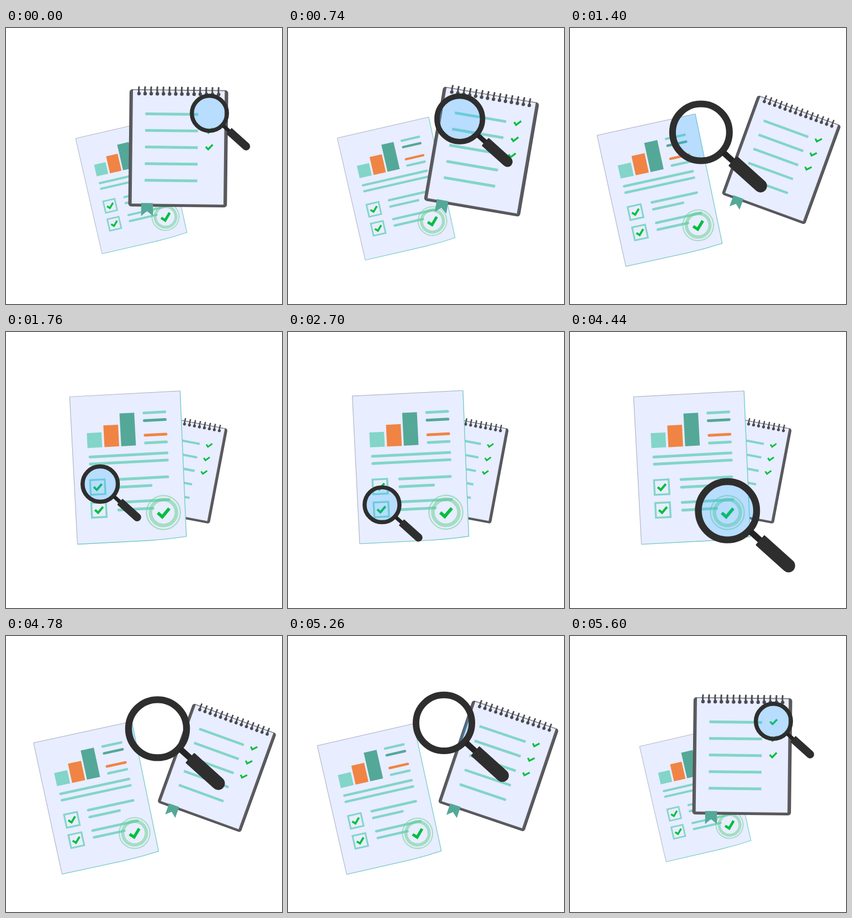
Animation of 500 by 500 pixels, one loop 5620 ms. Source, as an HTML page:

```html
<!DOCTYPE html>
<html lang="en">
<head>
<meta charset="utf-8">
<title>Document review</title>
<style>
  html, body { margin: 0; width: 100%; height: 100%; overflow: hidden; background: #fff; }
  svg { display: block; width: 100vw; height: 100vh; }
  .line { fill: none; stroke: #82d5c8; stroke-width: 5; }
  .round { stroke-linecap: round; }
  .tick { fill: none; stroke: #00bf3f; stroke-width: 3.4; }
  .ring { fill: none; stroke: #62ce8a; stroke-opacity: .5; }
</style>
</head>
<body>
<svg viewBox="0 0 500 500">
  <defs>
    <path id="sheet" d="M0 0H200.7L198 264.3Q165 267.6 130 268H0Z"/>
    <rect id="cover" width="176.5" height="210" rx="4"/>
    <clipPath id="papers">
      <use id="sheetClip" href="#sheet"/>
      <use id="coverClip" href="#cover"/>
    </clipPath>
  </defs>
  <g id="stack">
    <g id="report"></g>
    <g id="notepad"></g>
  </g>
  <g clip-path="url(#papers)"><circle id="glass" r=".84" fill="#2eadff" fill-opacity=".26"/></g>
  <g id="magnifier" fill="#2e2e2e">
    <circle r=".895" fill="none" stroke="#2e2e2e" stroke-width=".21"/>
    <g transform="rotate(42)">
      <path d="M.95 -.095H1.4V.095H.95Z" fill="#242424"/>
      <path d="M1.37 -.205H2.52a.205 .205 0 0 1 0 .41H1.37q-.03 0 -.03 -.03V-.175q0 -.03 .03 -.03Z"/>
    </g>
  </g>
</svg>
<script>
const LOOP = 5620;
const $ = id => document.getElementById(id);
const teal = '#82d5c8', deepTeal = '#54a898', orange = '#f08444', paper = '#e8edff';

// Artwork
const line = (x1, x2, y, color = teal, cls = 'line round') =>
  `<path class="${cls}" style="stroke:${color}" d="M${x1} ${y}H${x2}"/>`;
const bar = (x, height, color) =>
  `<rect x="${x}" y="${94.5 - height}" width="26.7" height="${height}" fill="${color}"/>`;
const tick = (x, y, size = 1, id = '') =>
  `<path ${id && `id="${id}"`} class="tick" pathLength="1" transform="translate(${x} ${y}) scale(${size})" d="M-6 0L-1.5 4.5L6.5 -4"/>`;
const checkbox = (y, id) =>
  `<rect x="28.9" y="${y - 13.3}" width="26.6" height="26.6" fill="none" stroke="${teal}" stroke-width="3.4"/>` +
  tick(42.2, y - .5, 1.2, id);

$('report').innerHTML = `
  <use href="#sheet" fill="${paper}"/>
  <path d="M0 268V0H200.7" fill="none" stroke="#a3abbd"/>
  <path d="M200.7 0L198 264.3Q165 267.6 130 268H0" fill="none" stroke="#74cdc6" stroke-width="1.4"/>` +
  bar(27.5, 27, teal) + bar(58.3, 39.3, orange) + bar(88.7, 59.5, deepTeal) +
  line(133, 171, 36.4) + line(133, 171, 50.4, deepTeal) +
  line(133, 171, 77, orange) + line(133, 171, 91) +
  line(31, 171, 111) + line(31, 171, 124) +
  line(78, 170, 154.4) + line(78, 139, 168.4) +
  line(78, 170, 196) + line(78, 140, 210) +
  checkbox(166.3, 'tickUpper') + checkbox(207.9, 'tickLower') + `
  <circle class="ring" cx="158.8" cy="218.7" r="30.7" stroke-width="2.3"/>
  <circle class="ring" cx="158.8" cy="218.7" r="23.6" stroke-width="6.6"/>` +
  tick(158.8, 218.7, 1.7, 'tickStamp');

const rows = [0, 1, 2, 3, 4].map(i => 43.1 + i * 30.1);
const coils = Array.from({ length: 14 }, (_, i) => {
  const x = 16 + i * 11.1;
  return `<path d="M${x} -6.5q-1 6 0 13" fill="none" stroke="#4a4a50" stroke-width="3"/>
    <circle cx="${x}" cy="6.6" r="3.2" fill="#4a4a50"/>`;
}).join('');

$('notepad').innerHTML = `
  <use href="#cover" fill="#5c5c60" stroke="#545458" stroke-width="2.2"/>
  <path d="M5 0H171.3V206H5Z" fill="${paper}"/>
  <path d="M5 0H171.3" stroke="#8d8d98"/>
  <path d="M22.3 204.8H43.7V228L32.8 219.2L22.3 228.5Z" fill="${deepTeal}"/>` +
  rows.map(y => line(28, 123.5, y, teal, 'line')).join('') +
  rows.slice(0, 3).map((y, i) => tick(144, y - 1.6, 1, i ? '' : 'tickNote')).join('') + coils;

// Easing
const smooth = u => u * u * (3 - 2 * u);
function settle(u) {           // cubic-bezier(.33, 0, 0, 1)
  let low = 0, high = 1;
  for (let i = 0; i < 24; i++) {
    const s = (low + high) / 2;
    if (.99 * (1 - s) ** 2 * s + s ** 3 < u) low = s; else high = s;
  }
  return smooth(low);
}
const depart = u => 1 - settle(1 - u);

// Keys are [time, pose, ease, bow]; bow bends the way from the previous pose.
function poseAt(keys, t) {
  const next = keys.findIndex(key => key[0] > t);
  if (next < 0) return keys[keys.length - 1][1];
  const [start, from] = keys[next - 1];
  const [end, to, ease = smooth, bow] = keys[next];
  const k = ease((t - start) / (end - start));
  return from.map((v, i) => v + (to[i] - v) * k + (bow ? bow[i] * 4 * k * (1 - k) : 0));
}
const journey = (front, apart, back, bow) => [
  [0, front], [600, front], [1200, apart, settle, bow], [1800, back, depart],
  [4400, back], [5000, apart, settle], [5600, front, depart, bow]
];

// Poses: x, y, scale, angle
const reportKeys = journey(
  [126, 200, .8, -12.95], [45.6, 198.5, .902, -12.85], [116.5, 116, 1, -2.87]);
const notepadKeys = journey(
  [311.8, 218, 1, .65], [386.3, 238.3, .905, 20.5], [311.3, 247.7, .825, 10.6],
  [4.6, -3.4, .031, 0]);

const overNote = [368.5, 154.5, 35.5], overUpper = [169.5, 277, 35.3];
const overLower = [170.5, 319.5, 35.3], overStamp = [285.5, 327, 59];
const magnifierKeys = [
  [0, overNote], [600, overNote], [1200, [240.8, 184.5, 58.7], settle, [1, -3.6, 0]],
  [1800, overUpper, depart], [2400, overUpper], [2800, overLower], [3360, overLower],
  [3800, overStamp, smooth, [0, 0, -1.6]],
  [4400, overStamp], [5000, [273.8, 157.7, 58.7], settle], [5600, overNote, depart]
];

const drawings = [
  ['tickNote', 0, 600], ['tickUpper', 1800, 2400], ['tickLower', 2800, 3360], ['tickStamp', 3800, 4400]
];

const place = (value, ...ids) => ids.forEach(id => $(id).setAttribute('transform', value));
const transform = ([x, y, scale, angle = 0]) =>
  `translate(${x} ${y}) rotate(${angle}) scale(${scale})`;

let reportOnTop = null;
function render(t) {
  place(transform(poseAt(reportKeys, t)), 'report', 'sheetClip');
  place(transform(poseAt(notepadKeys, t)) + ' translate(-88 -105)', 'notepad', 'coverClip');
  place(transform(poseAt(magnifierKeys, t)), 'magnifier', 'glass');

  const onTop = t >= 1200 && t < 5000;
  if (onTop !== reportOnTop) {
    $('stack').append($(onTop ? 'report' : 'notepad'));
    reportOnTop = onTop;
  }
  for (const [id, start, end] of drawings) {
    const drawn = t >= start && t < end ? smooth((t - start) / (end - start)) : 1;
    $(id).setAttribute('stroke-dasharray', drawn < 1 ? `${drawn} 2` : 'none');
  }
}

function frame() {
  render(performance.now() % LOOP);
  requestAnimationFrame(frame);
}
frame();
</script>
</body>
</html>
```
